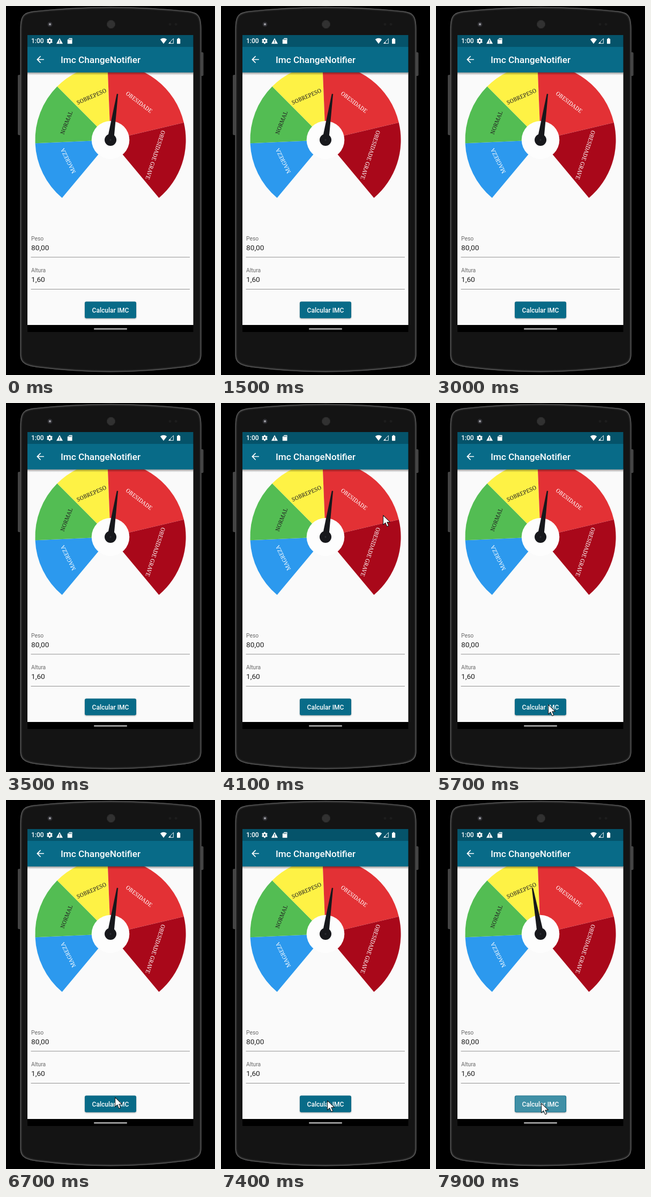
Recreate the animation shown at these times as an HTML page with a canvas. Size 390 by 686 pixels, loop 8 s.

```html
<!DOCTYPE html>
<html lang="pt">
<head>
<meta charset="utf-8">
<title>Imc ChangeNotifier</title>
<style>
  html, body { margin: 0; width: 100%; height: 100%; overflow: hidden; background: #000; }
  canvas { display: block; width: 390px; height: 686px; }
</style>
</head>
<body>
<canvas id="stage"></canvas>
<script>
const W = 390, H = 686, LOOP = 8000, PRESS = 7900;
const canvas = document.getElementById('stage');
const ctx = canvas.getContext('2d');
const dpr = window.devicePixelRatio || 1;
canvas.width = W * dpr;
canvas.height = H * dpr;

const TEAL = '#086b88', PAGE = '#fafafa', INK = '#17181c';
const HUB = { x: 195, y: 249 };
const ZONES = [
  { label: 'MAGREZA', end: 177.5, fill: '#2c99ee', ink: '#fff' },
  { label: 'NORMAL', end: 225, fill: '#53bd53', ink: '#222' },
  { label: 'SOBREPESO', end: 267.7, fill: '#fef245', ink: '#222' },
  { label: 'OBESIDADE', end: 346.7, fill: '#e33135', ink: '#fff' },
  { label: 'OBESIDADE GRAVE', end: 410, fill: '#a9081a', ink: '#fff' }
];

// Pointer stops: time, then tip position; null hides it.
const STOPS = [
  [0, null],
  [3700, [266, 482]], [3800, [296, 438]], [3900, [341, 350]], [4000, [325, 262]], [4100, [302, 208]],
  [4400, [330, 140]], [4500, [376, 46]], [4600, null],
  [5100, [317, 519]], [5200, [292, 536]], [5300, [258, 552]], [5400, [226, 560]], [5500, [209, 560]],
  [5900, [207, 555]], [6700, [203, 552]], [6800, [203, 553]],
  [7200, [200, 554]], [7400, [198, 558]], [7500, [196, 563]]
];

const BODY = new Path2D('M26.5 44C26.5 18 32 12 52 9.5Q195-6 340 9.5C359 12 364.5 18 364.5 44V648' +
  'C364.5 665 352 669 330 672Q195 689 60 672C38 669 26.5 665 26.5 648Z');

const rad = deg => deg * Math.PI / 180;

function path(d, fill, stroke, width = 1) {
  const p = new Path2D(d);
  if (fill) { ctx.fillStyle = fill; ctx.fill(p); }
  if (stroke) { ctx.strokeStyle = stroke; ctx.lineWidth = width; ctx.stroke(p); }
}

function rect(x, y, w, h, fill, r = 0) {
  ctx.fillStyle = fill;
  ctx.beginPath();
  ctx.roundRect(x, y, w, h, r);
  ctx.fill();
}

function disc(x, y, r, fill) {
  ctx.fillStyle = fill;
  ctx.beginPath();
  ctx.arc(x, y, r, 0, 2 * Math.PI);
  ctx.fill();
}

function text(str, x, y, size, fill, weight = 400, align = 'left', family = 'Roboto, sans-serif') {
  ctx.font = `${weight} ${size}px ${family}`;
  ctx.textAlign = align;
  ctx.fillStyle = fill;
  ctx.fillText(str, x, y);
}

function at(x, y, draw, scale = 1, turn = 0) {
  ctx.save();
  ctx.translate(x, y);
  ctx.rotate(turn);
  ctx.scale(scale, scale);
  draw();
  ctx.restore();
}

function drawBody() {
  rect(22, 128, 7, 112, '#444', 2);
  rect(362, 86, 6.5, 44, '#444', 2);
  ctx.save();
  ctx.clip(BODY);
  ctx.fillStyle = '#141414';
  ctx.fill(BODY);
  for (const [color, width] of [['#262626', 7], ['#545454', 3]]) {
    ctx.strokeStyle = color;
    ctx.lineWidth = width;
    ctx.stroke(BODY);
  }
  ctx.restore();
}

function drawPhone() {
  rect(0, 0, W, H, '#000');
  drawBody();
  disc(82, 34, 4.5, '#303034');
  disc(82, 34, 2, '#a0a0a6');
  disc(306, 34, 2.5, '#1d1d1d');
  disc(317, 34, 2.5, '#1d1d1d');
  disc(196, 34, 8, '#292929');
  for (let row = -3; row <= 3; row++) {
    for (let col = -3; col <= 3; col++) {
      if (row * row + col * col < 11) disc(196 + col * 2, 34 + row * 2, 0.6, '#505050');
    }
  }
  rect(40, 54, 309.5, 552, '#000');
  rect(164, 599.6, 62, 1.7, '#f4f4f4', 0.8);
}

function drawGear() {
  path('M0-4.1A4.1 4.1 0 1 1 0 4.1A4.1 4.1 0 1 1 0-4.1M0-1.8A1.8 1.8 0 1 0 0 1.8A1.8 1.8 0 1 0 0-1.8', '#fff');
  ctx.fillStyle = '#fff';
  for (let i = 0; i < 6; i++) {
    ctx.fillRect(-1.4, -5.4, 2.8, 2);
    ctx.rotate(Math.PI / 3);
  }
}

function drawBars() {
  rect(40, 54, 309.5, 22, '#05536a');
  rect(40, 76, 309.5, 47.6, TEAL);

  text('1:00', 47, 69, 12, '#fff', 500);
  at(81.5, 65, drawGear);
  path('M100 59.5L106 70.2H94Z', '#fff');
  rect(99.4, 63.2, 1.3, 3.5, '#05536a');
  rect(99.4, 67.6, 1.3, 1.3, '#05536a');
  path('M118 59.8H123.5V70.2H114.8V63Z', '#fff');
  for (const x of [117, 119, 121]) rect(x, 61, 1, 2.3, '#05536a');

  path('M287.8 62Q294 57.5 300.2 62L294 70.2Z', '#fff');
  path('M303.5 69.6L312.4 60.5V69.6Z', null, '#e6eff2', 1);
  path('M304 69.6L307 66.5V69.6Z', '#fff');
  rect(319, 61, 6.2, 9.3, '#fff', 0.8);
  rect(320.7, 59.7, 2.8, 2, '#fff');

  at(53.7, 89.2, () =>
    path('M20 11H7.83L13.42 5.41 12 4 4 12 12 20 13.41 18.59 7.83 13H20Z', '#fff'), 0.858);
  text('Imc ChangeNotifier', 102, 106, 17.2, '#fff', 500);
}

function drawDial() {
  let start = 130;
  for (const zone of ZONES) {
    ctx.fillStyle = zone.fill;
    ctx.beginPath();
    ctx.moveTo(HUB.x, HUB.y);
    ctx.arc(HUB.x, HUB.y, 140.6, rad(start), rad(zone.end));
    ctx.fill();

    const mid = (start + zone.end) / 2;
    at(HUB.x, HUB.y, () =>
      text(zone.label, 0, -84.5, 10.3, zone.ink, 400, 'center', '"Noto Serif", serif'), 1, rad(mid + 90));
    start = zone.end;
  }
  disc(HUB.x, HUB.y, 35.3, '#fdfdfd');
}

function drawNeedle(angle) {
  at(HUB.x, HUB.y, () => path('M-1.2-86L0-87L1.2-86L5.8-5H-5.8Z', INK), 1, rad(angle));
  disc(HUB.x, HUB.y, 11, INK);
  disc(HUB.x, HUB.y, 1.7, '#292b31');
}

function drawField(label, value, y) {
  text(label, 47, y, 10.3, '#686868');
  text(value, 47, y + 18, 13.7, '#202020');
  rect(46.5, y + 30.6, 296.5, 1, '#929292');
}

function drawButton(pressed) {
  ctx.save();
  ctx.shadowColor = 'rgba(0,0,0,.35)';
  ctx.shadowBlur = 2.5 * dpr;
  ctx.shadowOffsetY = dpr;
  rect(147, 549.5, 96, 31, TEAL, 3);
  ctx.restore();
  if (pressed) rect(147.8, 550.3, 94.4, 29.4, '#4090a6', 2.5);
  text('Calcular IMC', 195, 569.5, 12, '#fff', 500, 'center');
}

function drawPage(pressed) {
  ctx.save();
  ctx.beginPath();
  ctx.rect(40, 123, 309.5, 470);
  ctx.clip();
  rect(40, 123, 310, 470, PAGE);
  drawDial();
  drawNeedle(pressed ? -10 : 8.6);
  drawField('Peso', '80,00', 436);
  drawField('Altura', '1,60', 495.4);
  drawButton(pressed);

  const shade = ctx.createLinearGradient(0, 123.6, 0, 128.6);
  shade.addColorStop(0, 'rgba(0,0,0,.36)');
  shade.addColorStop(1, 'rgba(0,0,0,0)');
  rect(40, 123, 310, 6, shade);
  ctx.restore();
}

function drawPointer(t) {
  const tip = STOPS.findLast(stop => stop[0] <= t)[1];
  if (!tip) return;
  at(tip[0], tip[1], () => {
    ctx.lineJoin = 'round';
    path('M.6.8V17.4L4.5 13.8L7.3 20.2L10.1 19L7.4 12.7H12.6Z', '#fff', '#15191c', 1);
  }, 1.06);
}

function frame(now) {
  const t = now % LOOP;
  const pressed = t >= PRESS;
  ctx.setTransform(dpr, 0, 0, dpr, 0, 0);
  drawPhone();
  drawPage(pressed);
  drawBars();
  drawPointer(t);
}

const began = performance.now();
function tick() {
  frame(performance.now() - began);
  requestAnimationFrame(tick);
}
tick();
</script>
</body>
</html>
```
